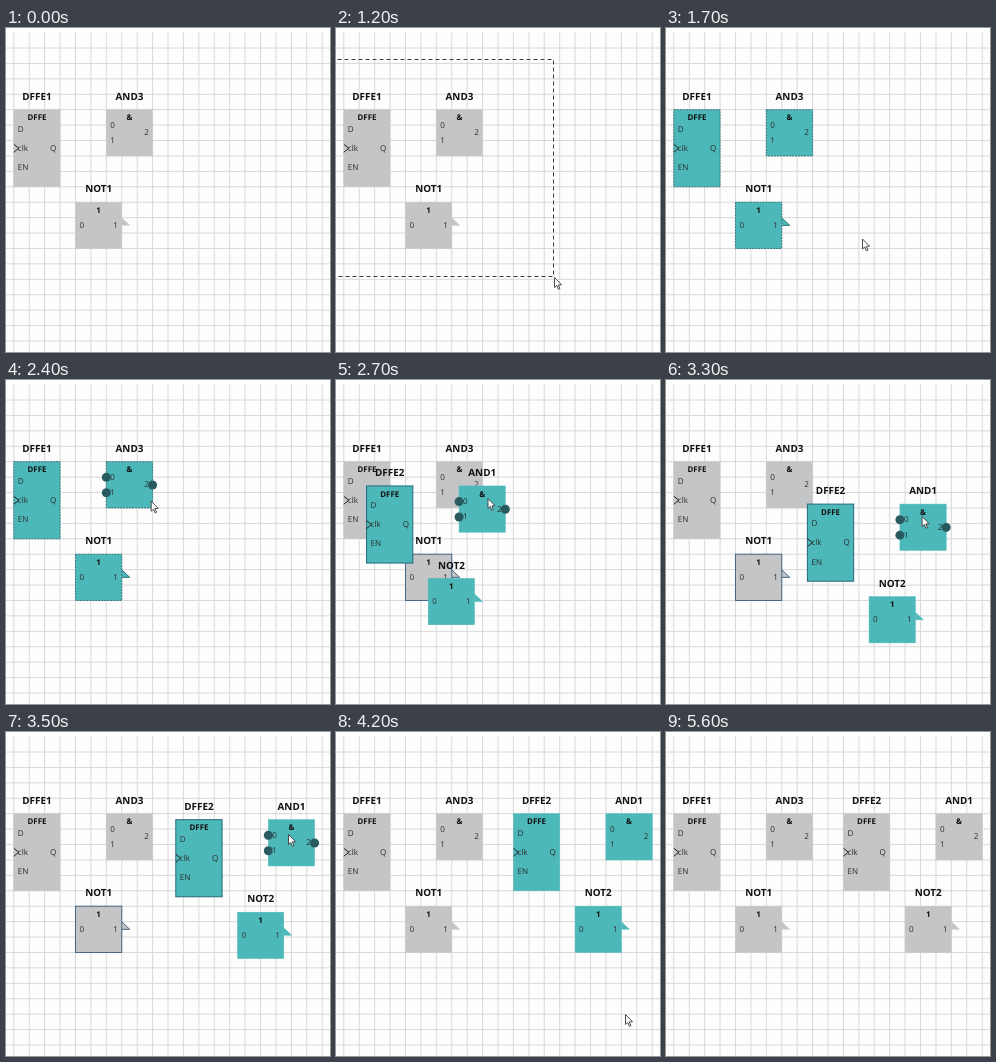
An HTML page with a canvas for the animation above (7100 ms loop, 324x324 px).

```html
<!DOCTYPE html>
<html lang="en">
<head>
<meta charset="utf-8">
<title>Copying logic gates</title>
<style>
  html, body { margin: 0; width: 100%; height: 100%; overflow: hidden; background: #fdfdfd; }
  canvas { display: block; width: 100vw; height: 100vh; }
</style>
</head>
<body>
<canvas id="stage" width="324" height="324"></canvas>
<script>
const ctx = document.getElementById('stage').getContext('2d');
const LOOP = 7100, STEP = 100, SIZE = 324, CELL = 15.42, LEFT = 7.8, TOP = 4.6;
const GREY = '#c4c5c6', TEAL = '#4cb8b9', PORT = '#285b60', EDGE = '#456785';
const FONT = '"Open Sans", "Noto Sans", sans-serif';

// Event times in ms
const APPEAR = 400, SELECT = 1500, HOVER = 2400, DRAG = 2700, DROP = 3900, DESELECT = 5300, HIDE = 5600;

// Turning points of the mouse and of the dragged copies: time, x, y
const mouse = [
  [300, -10, 31], [1200, 218, 249], [1400, 218, 249], [2600, 130, 95], [3000, 216, 187],
  [3500, 282, 102], [3800, 290, 97], [4200, 289, 282], [DESELECT, 289, 282], [HIDE, 291, 295]
];
const drag = [[2600, 0, 0], [3000, 91, 97], [3500, 162, 6], [3800, 11 * CELL, 0]];

// Positions and heights in grid cells; pins are spread evenly along each side
const gates = [
  { names: ['DFFE1', 'DFFE2'], sign: 'DFFE', col: 0, row: 5, h: 5, left: ['D', 'clk', 'EN'], right: ['Q'] },
  { names: ['AND3', 'AND1'], sign: '&', col: 6, row: 5, h: 3, left: ['0', '1'], right: ['2'] },
  { names: ['NOT1', 'NOT2'], sign: '1', col: 4, row: 11, h: 3, left: ['0'], right: ['1'] }
];

function at(path, t) {
  const i = path.findIndex(point => point[0] >= t);
  if (i < 1) return path.at(i).slice(1);
  const [t0, x0, y0] = path[i - 1], [t1, x1, y1] = path[i];
  const k = (t - t0) / (t1 - t0);
  return [x0 + (x1 - x0) * k, y0 + (y1 - y0) * k];
}

function text(str, x, y, size, weight, align) {
  ctx.font = `${weight} ${size}px ${FONT}`;
  ctx.textRendering = 'geometricPrecision';
  ctx.textAlign = align;
  ctx.fillText(str, x, y);
}

function poly(...points) {
  ctx.beginPath();
  points.forEach(([x, y]) => ctx.lineTo(x, y));
}

function drawGrid() {
  ctx.fillStyle = '#fdfdfd';
  ctx.fillRect(0, 0, SIZE, SIZE);
  ctx.strokeStyle = '#d8d8da';
  ctx.lineWidth = 1;
  ctx.beginPath();
  for (let i = 0; i < 21; i++) {
    const x = LEFT + i * CELL, y = TOP + (i + 1) * CELL;
    ctx.moveTo(x, TOP); ctx.lineTo(x, SIZE);
    ctx.moveTo(0, y); ctx.lineTo(SIZE, y);
  }
  ctx.stroke();
}

function drawPins(labels, x, inset, h, hover) {
  labels.forEach((label, i) => {
    const y = h * (i + 1) / (labels.length + 1);
    if (hover) {
      ctx.fillStyle = PORT;
      ctx.beginPath();
      ctx.arc(x, y + .2, 4.5, 0, 7);
      ctx.fill();
    }
    ctx.fillStyle = '#2b2b2b';
    text(label, x + inset, y + 2.6, 8.1, 400, inset > 0 ? 'left' : 'right');
    if (label === 'clk') {
      poly([0, y - 4], [5, y], [0, y + 4]);
      ctx.strokeStyle = '#222';
      ctx.lineWidth = 1;
      ctx.stroke();
    }
  });
}

function drawGate(gate, copy, [dx, dy], { fill, edge, dash = [], hover }) {
  const w = 3 * CELL, h = gate.h * CELL;
  ctx.save();
  ctx.translate(LEFT + gate.col * CELL + dx, TOP + gate.row * CELL + dy);
  ctx.fillStyle = fill;
  ctx.strokeStyle = edge || fill;
  ctx.lineWidth = edge ? 1 : .5;
  if (gate.sign === '1') {
    poly([w, h / 2 - 7.6], [w + 8, h / 2], [w, h / 2]);
    ctx.fill();
    ctx.stroke();
  }
  ctx.setLineDash(dash);
  ctx.fillRect(0, 0, w, h);
  ctx.strokeRect(0, 0, w, h);
  ctx.setLineDash([]);
  const ports = hover && gate.sign === '&';
  drawPins(gate.left, 0, 4, h, ports);
  drawPins(gate.right, w, -3.8, h, ports);
  ctx.fillStyle = '#111';
  text(gate.names[copy], w / 2, -9.9, 9.9, 700, 'center');
  text(gate.sign, w / 2, 10.6, 7.9, 700, 'center');
  ctx.restore();
}

function drawMarquee([x, y]) {
  ctx.strokeStyle = '#3c3c3c';
  ctx.lineWidth = 1;
  ctx.setLineDash([4, 3]);
  ctx.strokeRect(-12.5, 31.5, x + 12, y - 32);
  ctx.setLineDash([]);
}

function drawCursor([x, y]) {
  ctx.save();
  ctx.translate(x + .5, y + .5);
  poly([0, 0], [0, 10], [2.3, 8], [3.9, 11.8], [5.4, 11.1], [3.8, 7.4], [7, 7.2], [0, 0]);
  ctx.fillStyle = '#fff';
  ctx.fill();
  ctx.strokeStyle = '#3c3c3c';
  ctx.lineWidth = .9;
  ctx.stroke();
  ctx.restore();
}

function draw(t) {
  const within = (a, b) => t >= a && t < b;
  const selected = within(SELECT, DRAG), dragging = within(DRAG, DROP);
  const cursor = at(mouse, t), shift = at(drag, t);
  drawGrid();
  gates.forEach(gate => drawGate(gate, 0, [0, 0], {
    fill: selected ? TEAL : GREY,
    edge: selected ? '#2f7378' : dragging && gate.sign === '1' && EDGE,
    dash: selected ? [2, 1] : [],
    hover: within(HOVER, DRAG)
  }));
  if (t >= DRAG) gates.forEach(gate => drawGate(gate, 1, shift, {
    fill: t < DESELECT ? TEAL : GREY,
    edge: dragging && gate.sign === 'DFFE' && '#27687c',
    hover: dragging
  }));
  if (within(APPEAR, SELECT)) drawMarquee(cursor);
  if (within(APPEAR, HIDE)) drawCursor(cursor);
}

// The picture advances in tenths of a second
function tick() {
  draw(Math.floor(performance.now() % LOOP / STEP) * STEP);
  requestAnimationFrame(tick);
}
tick();
</script>
</body>
</html>
```
